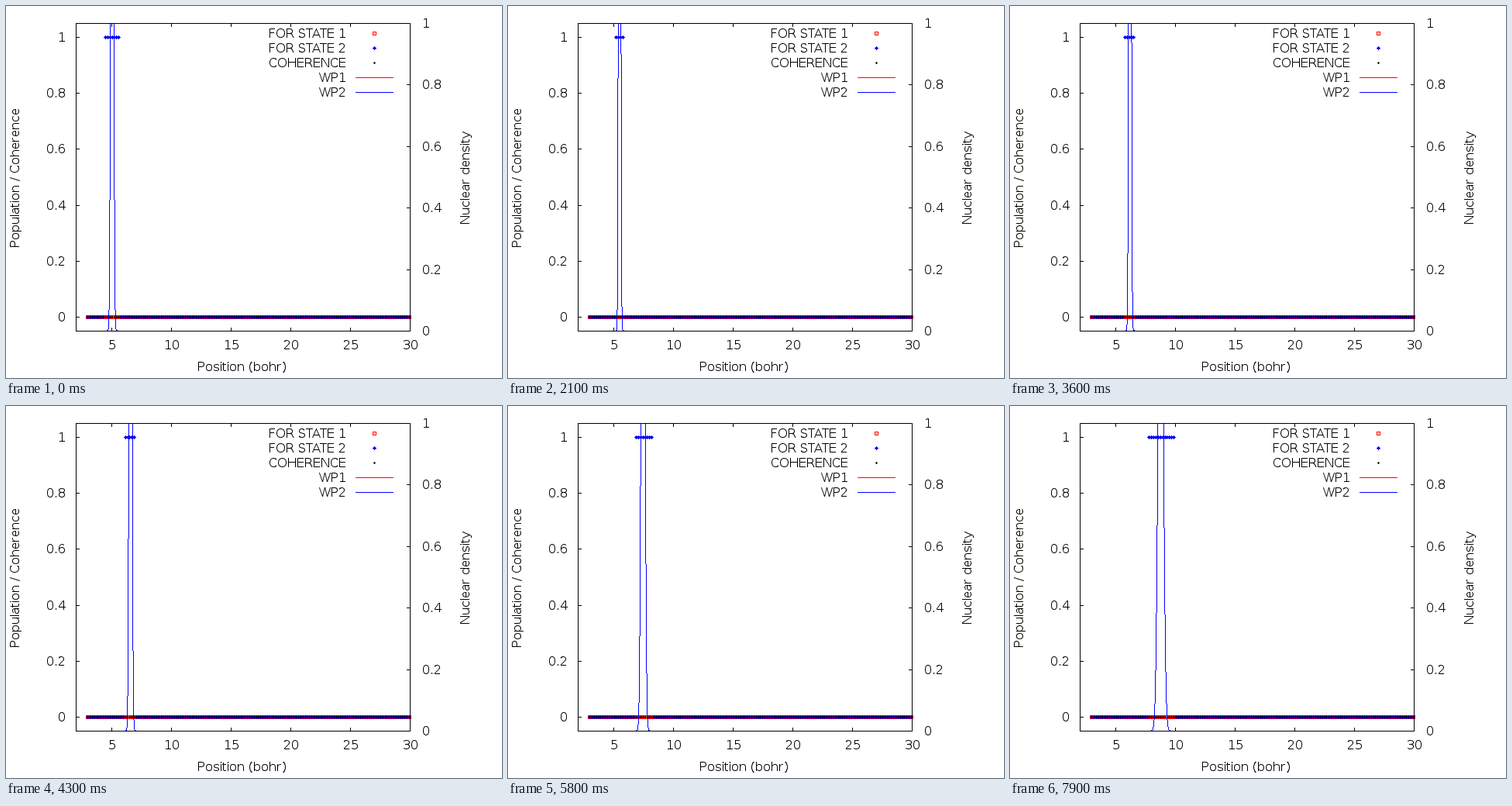
Recreate the animation shown at these times as a matplotlib script. Size 640 by 480 pixels, loop 8 s.

```python
import numpy as np
import matplotlib.pyplot as plt
from matplotlib.animation import FuncAnimation
from matplotlib.collections import PolyCollection

W, H, DPI = 640, 480, 100
FRAMES, INTERVAL = 80, 100
PX = 72 / DPI                                  # one pixel in points
LEFT, RIGHT, TOP, BOTTOM = 90, 521, 22, 419    # plot border
UNIT = (RIGHT - LEFT) / 28                     # pixels per bohr
BLUE, RED, BLACK = "#0000ff", "#ff0000", "#000000"

plt.rcParams.update({"font.family": "DejaVu Sans",
                     "text.hinting": "native", "text.hinting_factor": 1})
fig = plt.figure(figsize=(W / DPI, H / DPI), dpi=DPI, facecolor="white")
ax = fig.add_axes([0, 0, 1, 1])
ax.set_xlim(0, W)
ax.set_ylim(H, 0)
ax.axis("off")


def quads(boxes):
    return [[(x, y), (x + w, y), (x + w, y + h), (x, y + h)]
            for x, y, w, h in boxes]


def add_boxes(boxes, color, z):
    """Pixel-exact rectangles given as (x, y, width, height)."""
    col = PolyCollection(quads(boxes), facecolors=color, edgecolors="none",
                         linewidths=0, antialiaseds=False, zorder=z)
    ax.add_collection(col, autolim=False)
    return col


def label(x, y, s, ha="center", rotation=0):
    ax.text(x, y, s, ha=ha, va="baseline", fontsize=16 * PX, color=BLACK,
            rotation=rotation, rotation_mode="anchor")


def square(x, y):
    return [(x - 2, y - 2, 5, 1), (x - 2, y + 2, 5, 1), (x - 2, y - 2, 1, 5),
            (x + 2, y - 2, 1, 5), (x, y, 1, 1)]


def diamond(x, y):
    return [(x, y - 2, 1, 5), (x - 1, y - 1, 3, 3), (x - 2, y, 5, 1)]


def plus(x, y):
    return [(x - 1, y, 3, 1), (x, y - 1, 1, 3)]


def row(marker, xs, y):
    return [box for x in xs for box in marker(x, y)]


# Border, ticks and labels
lines = [(LEFT, TOP, 432, 1), (LEFT, BOTTOM, 432, 1),
         (LEFT, TOP, 1, 398), (RIGHT, TOP, 1, 398)]
for v in range(5, 31, 5):
    x = round(LEFT + (v - 2) * UNIT)
    lines += [(x, BOTTOM - 4, 1, 5), (x, TOP, 1, 5)]
    label(x + 0.8, 443, str(v))
for i in range(6):
    v = i / 5
    y = round(BOTTOM - (v + 0.05) * 397 / 1.1)
    y2 = round(BOTTOM - v * 397)
    lines += [(LEFT, y, 5, 1), (RIGHT - 4, y2, 5, 1)]
    label(77, y + 6, f"{v:g}", "right")
    label(537, y2 + 6, f"{v:g}", "left")
add_boxes(lines, BLACK, 10)
label(304.5, 471, "Position (bohr)")
label(18, 221, "Population / Coherence", rotation=90)
label(599, 221, "Nuclear density", rotation=90)

# Legend
names = ["FOR STATE 1", "FOR STATE 2", "COHERENCE", "WP1", "WP2"]
for i, name in enumerate(names):
    label(439, 41 + 19 * i, name, "right")
add_boxes(square(475, 35), RED, 5)
add_boxes(diamond(475, 54), BLUE, 5)
add_boxes(plus(475, 73), BLACK, 5)
add_boxes([(451, 92, 49, 1)], RED, 5)
add_boxes([(451, 111, 49, 1)], BLUE, 5)

# Sample points along the position axis
points = np.round(105.054 + 2.862 * np.arange(146)).astype(int)
points = points[points <= RIGHT]
add_boxes(row(square, points, 401), RED, 2)
state2 = add_boxes([], BLUE, 3)
add_boxes(row(plus, points, 401), BLACK, 4)
curve = add_boxes([], BLUE, 6)


def packet(n):
    """Centre and width of the wave packet, in pixels."""
    centre = 136.5 + np.hypot(1.05 * n, 31.1) - 31.1
    width = np.hypot(1, (n - 25) / (26 if n < 25 else 19.1))
    return centre, width


def occupied(n):
    """Range of positions where state 2 is populated."""
    lo = np.interp(n, [0, 9, 18, 28, 43, 58, 79],
                   [126.5, 130, 136, 141.8, 153, 164, 178])
    hi = np.interp(n, [0, 13, 28, 45, 54, 79],
                   [145.2, 147, 153.9, 168.5, 180.5, 212])
    # allow for the rounded pixel positions
    return lo - 0.3, hi + 0.3


def outline(centre, s):
    """Both flanks of the Gaussian, one run of pixels per row."""
    peak = UNIT / (np.sqrt(2 * np.pi) * s)
    rows = np.arange(TOP + 1, BOTTOM)
    reach = s * np.sqrt(2 * np.log(peak * 397 / (BOTTOM - rows)))
    boxes = []
    for side in (-1, 1):
        xs = np.round(centre + side * reach).astype(int)
        for y, x, after in zip(rows, xs, np.append(xs[1:], xs[-1] + 2 * side)):
            run = max(1, abs(after - x))
            boxes.append((x if side > 0 else x - run + 1, y, run, 1))
    return boxes


def update(n):
    lo, hi = occupied(n)
    inside = (points >= lo) & (points <= hi)
    state2.set_verts(quads(row(diamond, points[inside], 40)
                           + row(diamond, points[~inside], 401)))
    curve.set_verts(quads(outline(*packet(n))))
    return state2, curve


anim = FuncAnimation(fig, update, frames=FRAMES, interval=INTERVAL,
                     repeat=True, repeat_delay=0, blit=False)
plt.show()
```
